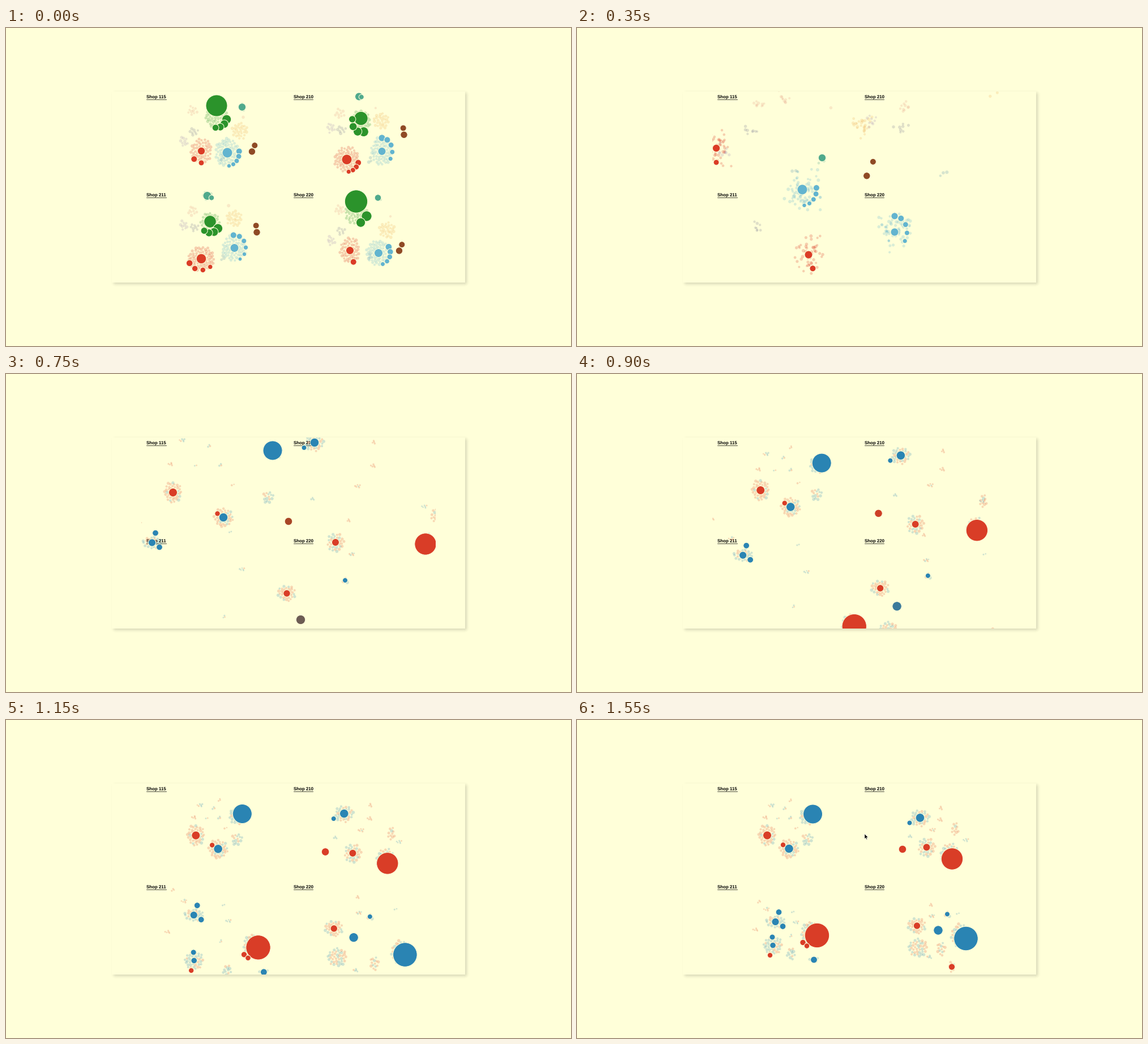
These frames come from a looping animation (998 px wide and 561 px high, 2.55 s). A matplotlib script:

```python
import math

import matplotlib.pyplot as plt
import numpy as np
from matplotlib.animation import FuncAnimation
from matplotlib.colors import to_rgba
from matplotlib.patches import Polygon, Rectangle

W, H, DPI = 998, 561, 64
PT = 72 / DPI
STEP, LOOP, SETTLED, RECOLOUR = 50, 2550, 1550, 600
BG = "#ffffd9"
RED, BLUE, GREEN, TEAL, BROWN = "#db3c26", "#62b4cf", "#2b932b", "#50aa8c", "#8f4a25"
YELLOW, PINK, LILAC, GREY, SLATE = "#f0b45f", "#e8a58a", "#a993b5", "#808096", "#5b95ad"
DEEP_BLUE, DEEP_RED = "#2a84b3", "#d93d27"
plt.rcParams["text.hinting"] = "none"
rng = np.random.default_rng(7)


def vec(*xy):
    return np.array(xy, float)


def polar(degrees, rx, ry):
    a = math.radians(degrees)
    return vec(rx * math.cos(a), ry * math.sin(a))


def sunflower(n):
    """Evenly filled unit disc with a little seeded disorder."""
    k = np.arange(n)
    rad = np.sqrt((k + 0.5) / n) if n > 1 else np.zeros(1)
    unit = np.stack([np.cos(k * 2.4), np.sin(k * 2.4)], 1) * rad[:, None]
    return 0.93 * unit + rng.normal(0, 0.12 / math.sqrt(n), (n, 2))


def dot_radii(n, size):
    return 0.92 * math.sqrt(size[0] * size[1] / n) * rng.uniform(0.7, 1.1, n)


class Scene:
    """Collects dots and discs; discs are painted last and carry a halo."""

    def __init__(self):
        self.dots, self.discs = [], []

    def dot(self, path, r, colour, alpha):
        self.dots.append((path, r, to_rgba(colour, alpha), to_rgba(colour, alpha), 0))

    def disc(self, path, r, colour, old=None):
        self.discs.append((path, r, to_rgba(colour), to_rgba(old or colour), 1))

    def finish(self):
        paths, *looks = zip(*self.dots, *self.discs)
        self.paths = np.array(paths)
        self.radius, self.new, self.old, self.halo = map(np.array, looks)


class Burst(Scene):
    """Clusters fly apart, then begin to regroup: one place per key time."""
    times = (0, 150, 350, 750)

    def at(self, t):
        k = max(np.searchsorted(self.times, t) - 1, 0)
        u = (t - self.times[k]) / (self.times[k + 1] - self.times[k])
        return self.paths[:, k] * (1 - u) + self.paths[:, k + 1] * u

    def cluster(self, colour, home, size, hub, moons, stops=None):
        home, size = vec(*home), vec(*size)
        if stops is None:
            away = home - centre
            stops = [home + 450 * away / np.hypot(*away)] * 2
        p1, p2 = np.array(stops, float)
        path = np.array([home, p1, p2, (home + p2) / 2])
        scale = np.array([size, 2 * size, 1.2 * size, size])
        # A large hub pushes its dots below itself.
        below = path + vec(0, 2 * max(hub - 9, 0))
        self.fill(colour, below, scale)
        if hub:
            self.disc(path, hub, colour)
        count, start, turn, r = moons
        for k in range(count):
            angles = start + k * turn + vec(0, 160, 0, 0)
            rim = [polar(a, *s) for a, s in zip(angles, 0.87 * scale)]
            self.disc(below + rim, r * 0.88**k + 0.6, colour)

    def fill(self, colour, path, scale):
        n = max(round(scale[0].prod() / 9), 1)
        loose = rng.normal(0, 0.55, (n, 2)).clip(-1.1, 1.1)
        for s, z, r in zip(sunflower(n), loose, dot_radii(n, scale[0])):
            self.dot(path + scale * [s, z, z, z], r, colour, 0.24)


class Gather(Scene):
    """Everything homes in on its end place; distance decays by a power."""

    def at(self, t):
        end, launch, shift, pull = np.split(self.paths, [2, 4, 6], axis=1)
        rest = np.minimum(((SETTLED - t) / 800) ** pull, 1.6)
        return end + launch * rest + shift * np.maximum(1 - rest, 0)

    def path(self, end, start, shift=(0, 0)):
        return np.concatenate([end, start - end, shift, [pull]])

    def cluster(self, end, start, size=None, blue=0.5, hub=None, moons=(), old=None):
        end, start = vec(*end), vec(*start)
        colour, r = hub or (None, 0)
        inward = (centre - end) / np.hypot(*(centre - end))
        shift = inward * 0.5 * r * (r > 10)
        if size:
            n = max(round(size[0] * size[1] / 8), 3)
            self.fill(n, size, blue, end, start, shift)
        if hub:
            self.disc(self.path(end, start), r, colour, old)
        for moon_colour, moon_r, dx, dy in moons:
            self.disc(self.path(end + (dx, dy), start + (dx, dy)), moon_r, moon_colour)

    def fill(self, n, size, blue, end, start, shift=vec(0, 0)):
        for s, r in zip(sunflower(n) * size, dot_radii(n, size)):
            colour = DEEP_BLUE if rng.random() < blue else "#e0502f"
            self.dot(self.path(end + s, start + s, shift), r, colour, 0.22)

    def crumbs(self, reach, *places):
        for place in places:
            n, end = int(rng.integers(2, 8)), vec(*place)
            side = 1.9 * math.sqrt(n)
            self.fill(n, vec(1.2, 0.8) * side, rng.choice([0.1, 0.85]),
                      end, centre + reach * (end - centre))


burst, gather = Burst(), Gather()


def small_groups(twist, reach):
    """Minor groups circle the chart; twist turns those on its right side."""
    for colour, angle, dist, size, turn, out in [
            (YELLOW, -5, 38, (15, 16), 1, 3.5), (PINK, -32, 52, (3, 3), 1, 1.6),
            (PINK, 221, 60, (9, 10), 0, 1.2), (LILAC, 166, 63, (8, 10), -0.7, 1.9),
            (GREY, 182, 43, (10, 7), -0.3, 1.5), (SLATE, 80, 45, (5, 6), 0, 1.5)]:
        offset = polar(angle + turn * twist, dist, dist)
        p = centre + offset
        far = centre + offset * out * reach
        scale = np.array([size] * 4) * [[1], [1.6], [1.2], [1]]
        burst.fill(colour, np.array([p, far, far, (p + far) / 2]), scale)
    for lean, r in [(-5, 5), (5, 5.7)]:
        p = centre + polar(24 + twist * 0.8 + lean, 68, 68)
        far = centre + (p - centre) * 2.3 * reach
        burst.disc(np.array([p, far, far, (p + far) / 2]), r, BROWN)


# Shop 115
centre, pull = vec(375, 185), 6
small_groups(0, 1)
burst.cluster(TEAL, (417, 139.5), (5, 9), 6.2, (0, 0, 0, 0), [(442, 207), (433, 229)])
burst.cluster(GREEN, (372, 137), (21, 23), 18.5, (4, 15, 27, 7))
burst.cluster(RED, (345, 217), (20, 24), 6.2, (2, 137, -47, 4.4), [(262, 237), (246, 212)])
burst.cluster(BLUE, (391, 220), (24, 27), 8.5, (5, -6, 22, 4.4), [(419, 286), (398, 285)])
gather.cluster((416.5, 166), (471, 135), (18, 17), 0.9, (DEEP_BLUE, 16.5))
gather.cluster((336, 203.5), (295, 209), (17, 20), 0.12, (DEEP_RED, 7))
gather.cluster((374.5, 227), (384, 253), (19, 18), 0.2, (DEEP_BLUE, 7.3),
               [(DEEP_RED, 4.2, -10.5, -6.7)])
gather.cluster((407, 210), (463, 217), (10, 12), 0.85)
gather.crumbs(2, (333, 172), (355, 173), (377, 173), (388, 190), (367, 156),
              (343, 151), (377, 142))

# Shop 210
centre, pull = vec(635, 190), 2.8
small_groups(-38, 1)
burst.cluster(TEAL, (623.5, 121), (5, 4), 6.5, (1, 12, 0, 3.4))
burst.cluster(GREEN, (627, 159.5), (18, 22), 11.7, (4, 72, 40, 7.4),
              [(751, 307), (900, 360)])
burst.cluster(RED, (602, 232), (24, 25), 8.5, (4, 15, 22, 4.4), [(519, 120), (495, 75)])
burst.cluster(BLUE, (664, 217.5), (21, 27), 6.5, (5, -90, 31, 5), [(594, 348), (561, 360)])
gather.cluster((606, 172.5), (545, 121), (18, 16), 0.75, (DEEP_BLUE, 7.3),
               [(DEEP_BLUE, 4, -18.5, 9)])
gather.cluster((617.5, 224.5), (582, 297), (16, 18), 0.65, (DEEP_RED, 6))
gather.cluster((662.5, 245), (741, 300), (18, 20), 0.5, (DEEP_RED, 18.7))
gather.cluster((668, 193), (757, 250), (7, 13), 0.1)
gather.cluster((575, 228), (499, 260), hub=(DEEP_RED, 6.3), old=BROWN)
gather.crumbs(2, (588, 205), (642, 176), (628, 194), (642, 155), (687, 212))

# Shop 211
centre, pull = vec(375, 362), 2.3
small_groups(-38, 5)
burst.cluster(TEAL, (355.5, 296), (10, 8), 7, (1, 30, 0, 3.6))
burst.cluster(GREEN, (360.5, 341.5), (19, 20), 10.3, (4, 33, 32, 7.2),
              [(575, 475), (640, 560)])
burst.cluster(RED, (345, 407), (26, 23), 8.3, (4, 157, -37, 4.7), [(215, 310), (180, 297)])
burst.cluster(BLUE, (403.5, 388), (23, 26), 7, (6, -95, 31, 4.5))
gather.cluster((350.5, 356), (258, 297.5), (18, 12), 0.85, (DEEP_BLUE, 6.1),
               [(DEEP_BLUE, 4.9, 6, -17), (DEEP_BLUE, 4.9, 13, 8)])
gather.cluster((346, 397.5), (278, 530), (18, 18), 0.65, (DEEP_BLUE, 4.8),
               [(DEEP_BLUE, 4.5, -1, -14.5), (DEEP_RED, 4.2, -5, 17.5)])
gather.cluster((424, 380), (530, 485), (20, 22), 0.6, (DEEP_RED, 21.2),
               [(DEEP_RED, 4.7, -25, 12.5), (DEEP_RED, 4.3, -18, 18.5)])
gather.cluster((418.5, 423), (600, 530), (9, 5), 1, (DEEP_BLUE, 5.4))
gather.cluster((378, 412), (440, 560), (9, 11), 0.6)
gather.crumbs(3.5, (381, 338), (387, 357), (378, 381), (316, 370), (322, 321), (335, 334))

# Shop 220
centre, pull = vec(635, 360), 2.3
small_groups(0, 5)
burst.cluster(TEAL, (657, 299.5), (7, 5), 5.3, (0, 0, 0, 0))
burst.cluster(GREEN, (618.5, 306), (22, 20), 19.7, (2, 15, 50, 8))
burst.cluster(RED, (607.5, 392.5), (19, 25), 6.5, (1, 68, 0, 4.4), [(465, 403.5), (409, 400)])
burst.cluster(BLUE, (658, 397), (24, 24), 7, (5, -31, 25, 4.8))
gather.cluster((600.5, 363), (496, 387), (18, 15), 0.2, (DEEP_RED, 5.7))
gather.cluster((602, 402), (517, 485), (18, 18), 0.45)
gather.cluster((687, 385.5), (775, 526), (18, 23), 0.4, (DEEP_BLUE, 20.8))
gather.cluster((638, 371), (520.5, 433.5), hub=(DEEP_BLUE, 7.7), old=BROWN)
gather.cluster((654, 342.5), (599, 364), (6, 6), 0.8, (DEEP_BLUE, 4))
gather.cluster((643, 404), (680, 530), (8, 14), 0.4)
gather.cluster((662, 435.5), (770, 560), (6, 10), 0.1, (DEEP_RED, 5.2))
gather.crumbs(3, (627, 346), (625, 326), (673, 341), (623, 418))

burst.finish()
gather.finish()

fig = plt.figure(figsize=(W / DPI, H / DPI), dpi=DPI, facecolor=BG)
ax = fig.add_axes([0, 0, 1, 1])
ax.axis("off")


def soft_box(size, low, high, sigma=2.6):
    edge = np.vectorize(lambda d: 0.5 * (1 + math.erf(d / sigma / math.sqrt(2))))
    at = np.arange(size) + 0.5
    return edge(at - low) * edge(high - at)


shadow = np.zeros((H, W, 4))
shadow[..., 3] = 0.15 * np.outer(soft_box(H, 114, 452), soft_box(W, 190, 814))
ax.imshow(shadow, extent=(0, W, H, 0), aspect="auto", zorder=0)
ax.set(xlim=(0, W), ylim=(H, 0))
ax.add_patch(Rectangle((187, 111.5), 624, 337.5, fc=BG, lw=0, zorder=1))

for i, number in enumerate([115, 210, 211, 220]):
    x, y = 248 + 259.6 * (i % 2), 124.4 + 173.2 * (i // 2)
    ax.text(x, y, f"Shop {number}", family="Liberation Sans", weight="bold",
            size=7.9 * PT, va="baseline", zorder=2)
    ax.plot([x, x + 34.6], [y + 1.4] * 2, color="black", lw=0.7 * PT, zorder=2)

circles = ax.scatter([], [], marker="o", zorder=3)
circles.set_clip_path(Rectangle((239, 112), 520, 337, transform=ax.transData))

ARROW = np.array([(0, 0), (0, 8.6), (2, 6.8), (3.4, 9.9), (4.8, 9.3),
                  (3.4, 6.3), (6.1, 6.1)])
arrow = ax.add_patch(Polygon(ARROW, fc="black", ec="white", lw=0.5 * PT, zorder=5))
BEAM = np.array([(-2, -5.5), (0, -4.5), (2, -5.5), (0, -4.5), (0, 4.5),
                 (-2, 5.5), (0, 4.5), (2, 5.5)])
beam, = ax.plot([], [], color="black", lw=0.9 * PT, zorder=5)


def draw_cursor(t):
    u = (t - 1300) / 250
    x, y = 520 - 12 * u, 133 + 68 * u
    over_text = y < 140
    beam.set_data(*(BEAM + (x, y)).T)
    arrow.set_xy(ARROW + (x, y))
    beam.set_visible(t >= 1250 and over_text)
    arrow.set_visible(t >= 1250 and not over_text)


def draw(i):
    t = min(i * STEP, SETTLED)
    scene = burst if t < RECOLOUR else gather
    fade = np.clip((t - 650) / 300, 0, 1)
    face = scene.old + (scene.new - scene.old) * fade
    edge = np.tile(to_rgba(BG), (len(face), 1))
    edge[:, 3] = scene.halo
    circles.set_offsets(scene.at(t))
    circles.set_sizes(((2 * scene.radius + scene.halo) * PT) ** 2)
    circles.set_facecolor(face)
    circles.set_edgecolor(edge)
    circles.set_linewidth(scene.halo * PT)
    draw_cursor(t)
    return circles, beam, arrow


anim = FuncAnimation(fig, draw, frames=LOOP // STEP, interval=STEP, repeat=True)
plt.show()
```
